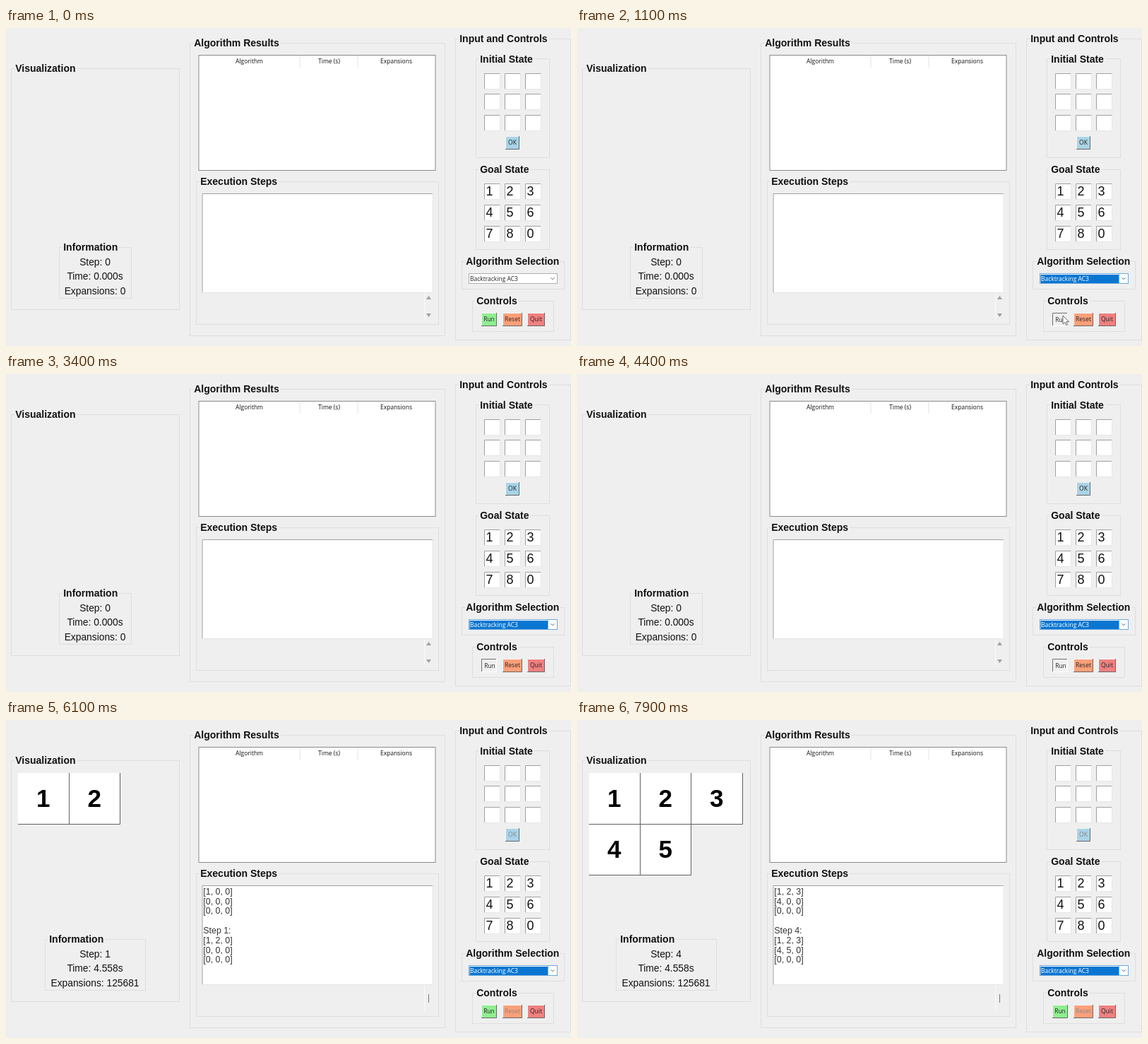
Recreate the animation shown at these times as an HTML page. Size 800 by 450 pixels, loop 8 s.

```html
<!DOCTYPE html>
<html lang="en">
<head>
<meta charset="utf-8">
<title>Puzzle solver</title>
<style>
  html, body { margin: 0; width: 100%; height: 100%; overflow: hidden; background: #efefef; }
  svg { display: block; width: 800px; height: 450px; }
  text { font: 14px "Liberation Sans", Arial, sans-serif; fill: #111; white-space: pre; }
  .title { font-weight: bold; stroke: #efefef; stroke-width: 5px; paint-order: stroke; }
  .info { font-size: 13.8px; text-anchor: middle; }
  .log { font-size: 12.4px; fill: #333; }
  .digit { font-size: 18px; }
  .tile { font-size: 35px; font-weight: bold; text-anchor: middle; fill: #000; }
  .small { font: 8.5px "Open Sans", "Noto Sans", sans-serif; }
  .mid { text-anchor: middle; }
</style>
</head>
<body>
<svg viewBox="0 0 800 450">
  <g id="base"></g>
  <g id="state"></g>
  <path id="cursor" d="M0 0V12L2.8 9.4L4.8 13.6L6.6 12.8L4.7 8.7H8.6Z" fill="#fff" stroke="#444" stroke-width=".8"/>
</svg>
<script>
const LOOP = 8000, FOCUS = 500, PRESS = 1000, SOLVED = 5500, STEP = 500;
const $ = id => document.getElementById(id);

const rect = (x, y, w, h, fill, stroke = 'none') =>
  `<rect x="${x}" y="${y}" width="${w}" height="${h}" fill="${fill}" stroke="${stroke}"/>`;
const path = (d, stroke, fill = 'none') => `<path d="${d}" stroke="${stroke}" fill="${fill}"/>`;
const text = (x, y, s, cls, fill) =>
  `<text x="${x}" y="${y}" class="${cls}"${fill ? ` style="fill:${fill}"` : ''}>${s}</text>`;

const group = (name, x, y, r, b, baseline = y + 4.7) =>
  rect(x + .5, y + .5, r - x, b - y, 'none', '#dedede') + text(x + 6.2, baseline, name, 'title');

// Box with one colour on its top and left edges, another on the right and bottom
const bevel = (x, y, w, h, fill, light, dark) => rect(x, y, w, h, fill) +
  path(`M${x + .5} ${y + h}V${y + .5}H${x + w}`, light) +
  path(`M${x + w - .5} ${y}V${y + h - .5}H${x}`, dark);
const sunken = (x, y, w, h) => bevel(x, y, w, h, '#fff', '#a0a0a0', '#e6e6e6');

const button = (name, x, y, w, fill, { pressed = false, disabled = false } = {}) => {
  const shift = pressed ? 1 : 0;
  const box = pressed ? bevel(x, y, w, 19, '#f0f0f0', '#707070', '#fff')
                      : bevel(x, y, w, 19, fill, '#f4f4f4', '#686868');
  return box + text(x + w / 2 + shift, y + 12.4 + shift, name, 'small mid', disabled ? '#858585' : '#222');
};

function drawBase() {
  let s = group('Visualization', 7, 57, 245, 398) +
    group('Algorithm Results', 260, 21, 621, 435) +
    group('Execution Steps', 269, 217, 612, 419) +
    group('Input and Controls', 636, 15, 799, 441) +
    group('Initial State', 665, 43, 769, 183, 48.5) +
    group('Goal State', 665, 200, 769, 313, 205) +
    group('Algorithm Selection', 645, 330, 790, 369, 335) +
    group('Controls', 660, 386, 775, 429, 391);

  s += rect(273, 38.5, 335, 163, '#fff', '#8a8a8a') +
    path('M416 39V56M498 39V56', '#e2e2e2') +
    text(344.5, 50, 'Algorithm', 'small mid') +
    text(457.5, 50, 'Time (s)', 'small mid') +
    text(552.5, 50, 'Expansions', 'small mid');

  s += sunken(277.5, 234, 327, 141) + path('M592.5 376V412', '#fafafa');

  for (let i = 0; i < 9; i++) {
    const x = [677, 706, 735][i % 3], row = Math.floor(i / 3);
    s += sunken(x, Math.floor(64 + row * 29.7), 23, 23);
    const y = 220 + row * 30;
    s += sunken(x, y, 23, 23) + text(x + 2.5, y + 17.3, (i + 1) % 9, 'digit');
  }
  return s + button('Quit', 738, 403, 25, '#f08080');
}

const combo = focused => rect(655.5, 347.5, 125, 14, '#fff', focused ? '#6fa8dc' : '#b0b0b0') +
  (focused ? rect(656.5, 349, 110.5, 12, '#0b76d1') + path('M767.5 348V361', '#8bb9e2') : '') +
  text(657, 357.6, 'Backtracking AC3', 'small', focused ? '#fff' : '#222') +
  path('M771.5 353.3L774 355.8L776.5 353.3', '#666');

const rowsAt = n => [0, 3, 6].map(r =>
  `[${[1, 2, 3].map(c => r + c <= n + 1 ? r + c : 0).join(', ')}]`);

function drawLog(step) {
  const lines = [];
  for (let n = 0; n <= step; n++) lines.push(`Step ${n}:`, ...rowsAt(n), '');
  lines.push('');
  return lines.slice(-10).map((line, i) => text(279.3, 246.8 + i * 13.8, line, 'log')).join('');
}

// Faces first, so that no tile covers its neighbour's border
function drawTiles(step) {
  let faces = '', lines = '';
  for (let i = 0; i <= step; i++) {
    const x = 17 + i % 3 * 72.5, y = 75 + Math.floor(i / 3) * 72;
    const right = Math.floor(x + 72) + .5;
    faces += rect(x, y, 72.5, 73, '#fff');
    lines += path(`M${right} ${y}V${y + 72.5}H${x}`, '#606060') + text(x + 35.8, y + 48, i + 1, 'tile');
  }
  return faces + lines;
}

function drawState(focused, pressed, step) {
  const solved = step >= 0, x = solved ? 55 : 75;
  const scroll = step > 0
    ? path('M598.5 388V400', '#777')
    : path('M595 384L598.5 379L602 384Z', 'none', '#a0a0a0') +
      path('M595 404L598.5 409L602 404Z', 'none', '#a0a0a0');
  return group('Information', x, 310, 252 - x, 382) +
    text(126, 336, `Step: ${Math.max(step, 0)}`, 'info') +
    text(126, 356.3, `Time: ${solved ? '4.558' : '0.000'}s`, 'info') +
    text(126, 376.6, `Expansions: ${solved ? 125681 : 0}`, 'info') +
    combo(focused) + scroll + drawTiles(step) + drawLog(step) +
    button('OK', 707, 153, 20, '#a9d3e8', { disabled: solved }) +
    button('Run', 673, 403, 22, '#90ee90', { pressed }) +
    button('Reset', 703, 403, 28, '#ffa07a', { disabled: solved });
}

// Pointer stops: time, x, y
const route = [[300, 716, 355], [500, 716, 355], [900, 688, 407], [1350, 688, 407], [1800, 699, 452]];

function moveCursor(t) {
  const i = route.findIndex(stop => stop[0] > t);
  $('cursor').style.display = i > 0 ? '' : 'none';
  if (i < 1) return;
  const [t0, x0, y0] = route[i - 1], [t1, x1, y1] = route[i];
  const p = (t - t0) / (t1 - t0), k = p * p * (3 - 2 * p);
  $('cursor').setAttribute('transform', `translate(${x0 + (x1 - x0) * k} ${y0 + (y1 - y0) * k})`);
}

let shown;
function frame() {
  const t = performance.now() % LOOP;
  const state = [t >= FOCUS, t >= PRESS && t < SOLVED, Math.max(-1, Math.floor((t - SOLVED) / STEP))];
  if (String(state) !== shown) {
    shown = String(state);
    $('state').innerHTML = drawState(...state);
  }
  moveCursor(t);
  requestAnimationFrame(frame);
}

$('base').innerHTML = drawBase();
frame();
</script>
</body>
</html>
```
